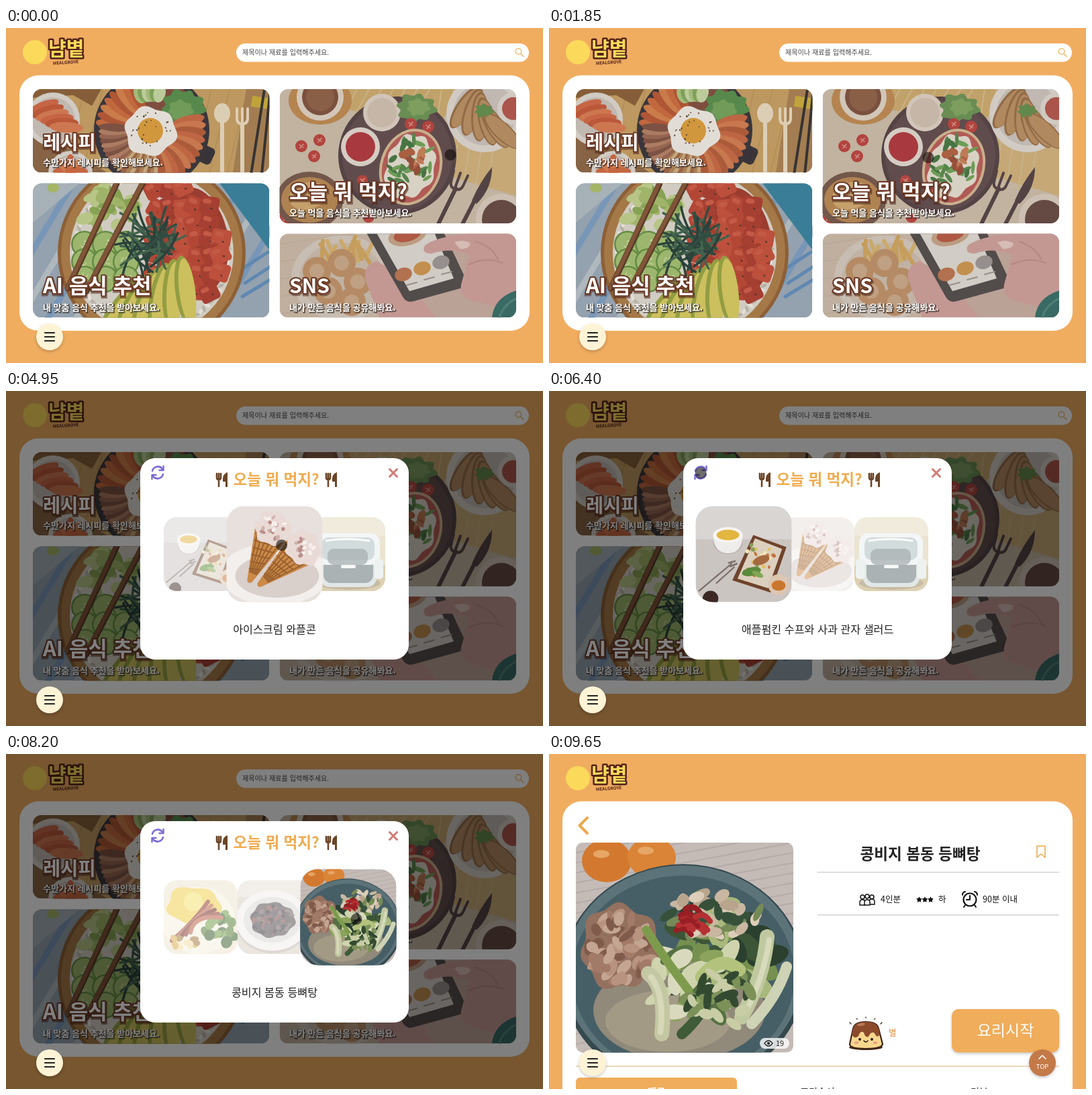
Write an HTML page that moves like this. It is 800 px wide and 499 px high and loops after 9700 ms.

```html
<!DOCTYPE html>
<html lang="ko">
<head>
<meta charset="utf-8">
<title>Recipe app</title>
<style>
html, body { margin: 0; width: 100%; height: 100%; overflow: hidden; background: #f0ad60; }
svg { display: block; width: 100vw; height: 100vh; }
text { font-family: "Noto Sans CJK KR", "Noto Sans CJK", "Noto Sans", sans-serif; }
.lift { filter: drop-shadow(0 2px 2px rgba(0, 0, 0, .22)); }
</style>
</head>
<body>
<svg id="stage" viewBox="0 0 800 499" preserveAspectRatio="none"></svg>
<script>
const LOOP = 9700;
const ORANGE = '#f0ad60';

// ---------- shape helpers ----------
let seed = 7;
const rnd = (a = 0, b = 1) => {
  seed = (seed * 16807) % 2147483647;
  return a + (b - a) * seed / 2147483647;
};
const rep = (n, fn) => Array.from({ length: n }, (_, i) => fn(i)).join('');
const pick = (list, i) => list[i % list.length];
const C = (x, y, r, f, more = '') => `<circle cx="${x}" cy="${y}" r="${r}" fill="${f}" ${more}/>`;
const E = (x, y, rx, ry, f, rot = 0) =>
  `<ellipse cx="${x}" cy="${y}" rx="${rx}" ry="${ry}" fill="${f}" transform="rotate(${rot} ${x} ${y})"/>`;
const R = (x, y, w, h, r, f, more = '') =>
  `<rect x="${x}" y="${y}" width="${w}" height="${h}" rx="${r}" fill="${f}" ${more}/>`;
const P = (d, f, more = '') => `<path d="${d}" fill="${f}" ${more}/>`;
const L = (d, s, w, more = '') =>
  `<path d="${d}" fill="none" stroke="${s}" stroke-width="${w}" stroke-linecap="round" stroke-linejoin="round" ${more}/>`;
const T = (x, y, size, s, more = '') => `<text x="${x}" y="${y}" font-size="${size}" ${more}>${s}</text>`;
const G = (s, more = '') => `<g ${more}>${s}</g>`;
const MID = 'text-anchor="middle"';

// ellipses laid along an arc, long side pointing outwards
const fan = (x, y, r, a, b, n, rx, ry, cols) => rep(n, i => {
  const deg = a + (b - a) * i / Math.max(1, n - 1), q = deg * Math.PI / 180;
  return E(x + r * Math.cos(q), y + r * Math.sin(q), rx, ry, pick(cols, i), deg);
});
const blob = (x, y, rx, ry, amp, k, f) => {
  const pts = Array.from({ length: 60 }, (_, i) => {
    const q = i * Math.PI / 30, m = 1 + amp * Math.sin(k * q) + amp * .5 * Math.cos(3 * q);
    return (x + rx * m * Math.cos(q)).toFixed(1) + ' ' + (y + ry * m * Math.sin(q)).toFixed(1);
  });
  return P('M' + pts.join('L') + 'z', f);
};
const scatter = (n, x, y, rx, ry, a, b, cols) => rep(n, i => {
  const q = rnd(0, 6.28), m = Math.sqrt(rnd());
  return E(x + rx * m * Math.cos(q), y + ry * m * Math.sin(q), a * rnd(.7, 1.2), b * rnd(.7, 1.2), pick(cols, i), rnd(0, 180));
});
let clips = 0;
const clip = (x, y, w, h, r, s) => {
  const id = 'clip' + clips++;
  return `<clipPath id="${id}">${R(x, y, w, h, r, '#000')}</clipPath>` + G(s, `clip-path="url(#${id})"`);
};

// ---------- home cards ----------
const plate = (x, y, r) => C(x, y, r, '#ddd7d0') + C(x, y, r * .82, '#c9c1ba');
const tomato = (x, y, r = 9) => C(x, y, r, '#b93a36') + L(`M${x - 3} ${y - 2}l6 4M${x + 3} ${y - 3}l-5 6`, '#e2a79c', 1.2);

const recipeCard = () =>
  R(40, 91, 352, 124, 0, '#c69c5c') +
  rep(12, i => L(`M${90 + i * 27} 91l-30 124`, '#b98f52', 1.5)) +
  P('M358 91H392V215H338z', '#a87d4b') +
  P('M40 91H142L128 116 100 100 40 104z', '#85592f') + P('M40 150L110 190 150 215H40z', '#875f3c') +
  plate(70, 136, 40) +
  rep(6, i => E(55 + i * 7, 118 + i * 6, 25, 8, pick(['#d0613c', '#c2512f', '#d9754a'], i), -22 + i * 5)) +
  plate(96, 216, 33) + fan(96, 214, 9, 180, 360, 5, 17, 7, ['#cf6238', '#da7a4a']) +
  R(287, 176, 22, 26, 6, '#2b282e', 'transform="rotate(25 298 189)"') +
  C(217, 152, 86, '#2d2a31') + C(217, 152, 77, '#7c4535') +
  fan(217, 152, 57, -172, -112, 8, 27, 8, ['#cc6435', '#b44f2a', '#d47b42']) +
  fan(217, 152, 56, -108, -78, 6, 14, 9, ['#a9c47c', '#7fa653', '#c5d7a0']) +
  blob(264, 118, 31, 25, .1, 9, '#4f8a45') + blob(260, 122, 18, 14, .1, 7, '#6d9f54') +
  fan(217, 152, 56, -14, 78, 12, 25, 8, ['#c7623b', '#d27747', '#b25530']) +
  fan(217, 152, 55, 85, 135, 11, 25, 4, ['#cfac80', '#b0804f', '#9b613c']) +
  fan(217, 152, 55, 140, 184, 9, 24, 6, ['#97614a', '#b27b5e', '#7b4b3a']) +
  blob(215, 154, 38, 36, .06, 6, '#f0ece5') + C(215, 153, 19, '#dd9b33') +
  scatter(26, 215, 153, 31, 29, 1.5, 1, ['#5a432c']) +
  G(E(322, 127, 12, 15, '#eadbbf') + R(319, 139, 6, 82, 3, '#eadbbf') +
    L('M344 120v14q0 9 8 9t8-9v-14M352 120v23', '#eadbbf', 4) + R(349, 140, 6, 80, 3, '#eadbbf')) +
  R(366, 103, 40, 16, 0, '#c9aa31', 'transform="rotate(8 380 110)"') +
  L('M386 85L365 218M393 100L381 218', '#2a2628', 4);

const bowlCard = () =>
  R(40, 231, 352, 200, 0, '#95a5b3') +
  rep(11, i => L(`M${20 + i * 42} 225l-130 215`, pick(['#7698bd', '#b2bec4'], i), 9)) +
  P('M318 231H392V330z', '#317d98') + P('M40 290L110 231H40z', '#a9b7be') +
  E(70, 238, 9, 7, '#a7bb64') + L('M350 360l40 -26M356 380l40-26M352 400l40-24', '#5a89b6', 5) +
  C(217, 335, 140, '#8d5c2e') + C(217, 335, 135, '#a87740') + C(217, 335, 122, '#d9d5ca') +
  rep(100, i => { const q = i * .063; return E(217 + 114 * Math.cos(q), 335 + 114 * Math.sin(q), 5, 2.4, pick(['#eeebe2', '#bdb7aa'], i), i * 47); }) +
  E(277, 318, 54, 82, '#9c3526', -8) +
  rep(42, i => {
    const x = 222 + (i % 6) * 20 + rnd(-4, 4), y = 240 + Math.floor(i / 6) * 25 + rnd(-4, 4);
    if (Math.hypot(x - 210, y - 328) > 116) return '';
    return G(R(x - 14, y - 13, 29, 27, 5, pick(['#b8412e', '#a83829', '#c24b34'], i)) +
      R(x - 10, y - 9, 13, 7, 4, '#c9563f') + E(x + 4, y + 5, 2, 1, '#3b2a22', 30), `transform="rotate(${rnd(-30, 30)} ${x} ${y})"`);
  }) +
  scatter(32, 153, 270, 43, 33, 12, 8, ['#a3ba66', '#87a64e', '#bccd88']) +
  rep(9, i => {
    const x = 117 + (i % 3) * 31, y = 322 + Math.floor(i / 3) * 26;
    return C(x, y, 20, '#5f8c3c') + C(x, y, 17.5, '#9fbc6b') + scatter(5, x, y, 8, 8, 2, 1, ['#cfdba5']);
  }) +
  rep(6, i => E(172 + i * 19, 416 - i * 5, 15, 52, '#93a03b', 38 - i * 9) + E(175 + i * 19, 417 - i * 5, 12, 49, '#d3c65a', 38 - i * 9)) +
  rep(34, i => {
    const q = rnd(0, 6.28), x = 213 + rnd(-24, 24), y = 319 + rnd(-24, 24), a = 32 * Math.cos(q), b = 32 * Math.sin(q);
    return L(`M${x - a} ${y - b}q${a + b * .3} ${b - a * .3} ${a * 2} ${b * 2}`, pick(['#28473a', '#1f3a33', '#3b6048'], i), 3.5);
  }) +
  L('M168 225L92 388M207 225L120 392', '#50301e', 9) + L('M167 225L91 388M206 225L119 392', '#805030', 6);

const todayCard = () =>
  R(408, 91, 352, 200, 0, '#cbbba6') +
  P('M500 91H680L645 145 500 120z', '#cba768') + P('M640 160H760V250L640 215z', '#cfae76') +
  rep(14, i => L(`M${505 + i * 18} 91l-22 ${i > 7 ? 150 : 40}`, '#d3ba88', 2)) +
  E(468, 108, 47, 36, '#bd8549') + C(468, 103, 35, '#ddd1c2') + C(468, 103, 27, '#784934') + C(468, 103, 21, '#8b5a3f') +
  C(583, 190, 88, '#4c393c') + C(583, 190, 82, '#5a4346') +
  C(560, 126, 28, '#ddd0c3') + C(560, 126, 22, '#d0bfae') +
  C(528, 177, 29, '#e2d8cf') + C(528, 177, 22, '#ad2f36') +
  blob(611, 119, 28, 20, .12, 8, '#648f4c') + blob(614, 118, 16, 12, .12, 7, '#7ca35c') +
  tomato(603, 143) + tomato(629, 147) + tomato(531, 227, 8) +
  G(E(603, 207, 46, 58, '#d3b78f') + E(603, 207, 42, 54, '#b8554f') + blob(602, 207, 36, 48, .06, 8, '#e5dfd2') +
    scatter(26, 600, 207, 33, 43, 10, 3.5, ['#4e8543', '#6aa052', '#3d7239']) +
    scatter(13, 603, 203, 20, 25, 8, 4.5, ['#b05a38', '#c97a50', '#974631']), 'transform="rotate(18 603 207)"') +
  tomato(440, 176) + tomato(467, 167) + tomato(459, 191) + tomato(415, 284) +
  E(452, 257, 50, 43, '#705044') + E(452, 256, 42, 34, '#b5834a') + E(450, 250, 29, 20, '#d0a569', -15) +
  plate(713, 128, 57) +
  rep(6, i => E(684 + i * 11, 118 + i * 7, 13, 37, '#94683f', 34 - i * 16) + E(685 + i * 11, 119 + i * 7, 11, 34, '#b88b5c', 34 - i * 16)) +
  blob(712, 123, 13, 9, .2, 7, '#5c8a45') +
  C(756, 120, 24, '#ddd6ce') + C(756, 120, 17, '#b14d44') +
  L('M667 213l-4 16q-2 8 6 11t12-5l7-15M677 216l-8 22', '#4b393b', 4) + L('M670 239L642 296', '#4b393b', 6) +
  P('M724 207Q724 240 701 262L694 257Q705 231 724 207z', '#4b393b') + L('M697 259L680 292', '#4b393b', 6) +
  C(738, 285, 38, '#d8cbbd') + C(738, 285, 29, '#5e4139') + E(540, 284, 8, 6, '#b93a36');

const socialCard = () =>
  R(408, 306, 352, 125, 0, '#c9b7a4') + P('M640 306H760V431H610z', '#c4a79b') +
  rep(5, i => L(`M408 ${322 + i * 26}l180 -26`, '#bfab98', 1.2)) +
  E(500, 372, 75, 63, '#d3c7bb') + E(500, 372, 63, 52, '#c9baab') +
  rep(13, i => L(`M${470 + i * 6} ${350 - i % 4 * 3}l${rnd(-25, 20)} ${rnd(-34, -14)}`, pick(['#cfa257', '#d6b069'], i), 6)) +
  rep(5, i => C(pick([463, 500, 524, 480, 515], i), pick([362, 350, 378, 392, 408], i), 16, '#c9a584', 'stroke="#bd8d62" stroke-width="10"')) +
  P('M552 347Q527 356 538 382L556 431H640L594 372z', '#cd9c97') +
  P('M534 300L592 402Q598 410 607 407L680 387Q689 383 685 374L650 300z', '#494344') +
  P('M549 300L601 392 667 373 636 300z', '#ddd8d1') +
  E(598, 309, 29, 15, '#c3a082', -14) + E(598, 308, 21, 10, '#b5533d', -14) +
  rep(3, i => E(592 + i * 28, 367 - i * 9, 13, 10, pick(['#b96f48', '#cc9147', '#989190'], i), -18) +
    L(`M${597 + i * 26} ${383 - i * 8}l15 -4`, '#9b928c', 2)) +
  P('M760 306H690Q640 311 624 324 618 336 634 336 664 326 690 338L680 375Q672 398 690 405L760 424z', '#cd9c97') +
  P('M668 319q14-5 24 2-2 9-16 8z', '#e2c6be') + L('M700 318Q725 326 733 345M690 352Q715 340 740 350', '#b98884', 2) +
  P('M724 431Q727 402 760 391V431z', '#2c6660') + L('M735 431q5-18 25-28', '#4a8076', 3);

const label = (x, y, size, title, sub, gap) =>
  T(x + 1, y + 2, size, title, 'fill="#4a2418" stroke="#4a2418" stroke-width="5" opacity=".55" font-weight="700"') +
  T(x, y, size, title, 'fill="#fff" stroke="#6b3825" stroke-width="4" stroke-linejoin="round" paint-order="stroke" font-weight="700"') +
  T(x + 1, y + gap + 1, 13, sub, 'fill="#2b211c" stroke="#2b211c" stroke-width="1.6" opacity=".65" font-weight="700"') +
  T(x, y + gap, 13, sub, 'fill="#fff" font-weight="700"');

const logo = () =>
  C(43, 36, 18, '#fbd95a') +
  T(63, 42, 29, '냠볕', 'font-weight="900" fill="#fbd95a" stroke="#55231a" stroke-width="5" stroke-linejoin="round" paint-order="stroke"') +
  T(70, 55, 6.4, 'MEALGROVE', 'font-weight="700" fill="#55231a" transform="rotate(-4 70 55)"');

// the grey veil mutes the artwork
const card = (x, y, w, h, veil, art) =>
  clip(x, y, w, h, 13, art + R(x, y, w, h, 0, '#85807c', `opacity="${veil}"`));

const home = () =>
  logo() + R(343, 23, 436, 27.5, 13.7, '#fff') +
  T(352, 40, 10.1, '제목이나 재료를 입력해주세요.', 'fill="#444"') +
  C(763.5, 35, 4.3, 'none', 'stroke="#efb45c" stroke-width="1.3"') + L('M767 38.5l4 4', '#efb45c', 1.5) +
  R(20, 70.5, 760, 380.5, 28, '#fff') +
  card(40, 91, 352.5, 124.5, .14, recipeCard()) + label(55, 181, 28.5, '레시피', '수만가지 레시피를 확인해보세요.', 24) +
  card(40, 231.5, 352.5, 200, .1, bowlCard()) + label(55, 395, 31, 'AI 음식 추천', '내 맞춤 음식 추천을 받아보세요.', 26) +
  card(407.5, 91, 352.5, 200, .14, todayCard()) + label(422, 255, 31, '오늘 뭐 먹지?', '오늘 먹을 음식을 추천받아보세요.', 25) +
  card(407.5, 306.5, 352.5, 125, .14, socialCard()) + label(422, 395, 30, 'SNS', '내가 만든 음식을 공유해봐요.', 26);

// ---------- dishes, each drawn in a 110 x 110 box ----------
const soup = () =>
  R(0, 0, 110, 110, 0, '#cbc5c2') + R(0, 0, 110, 38, 0, '#d9d5d2') +
  E(37, 42, 17, 13, '#bcb5b1') + P('M20 33Q21 54 37 54T54 33z', '#efedeb') + E(37, 33, 17, 9, '#f6f4f2') + E(37, 33, 13, 6, '#e3b541') +
  P('M66 33L104 47 86 99 42 85z', '#6f432c') + P('M68 37L99 49 83 94 48 83z', '#dccfbd') +
  scatter(22, 74, 62, 17, 22, 2.5, 2, ['#f3e6b4', '#c47440', '#e2c05f', '#8a9a58']) +
  E(75, 62, 10, 5, '#a56a3f', -20) + E(64, 75, 11, 5, '#5b8a3a', -12) + E(71, 78, 7, 3, '#7fa653', 25) +
  L('M41 66L4 97M44 70L24 88', '#7c6f69', 1.8) + L('M45 63l-7 2M47 66l-7 3', '#7c6f69', 2) +
  C(95, 90, 12, '#ddc6b0') + E(95, 91, 8, 6, '#c9772f') + C(17, 106, 9, '#3c2724');

const cones = () => {
  const cone = (x, y, rot) => G(
    P('M-19 0H19L3 58Q0 62 -3 58z', '#cb8a48') +
    rep(6, i => L(`M${-16 + i * 2} ${i * 8 + 5}L${16 - i * 2} ${i * 8 + 1}M${-15 + i * 6} 2L${-4 + i * 1.6} 48`, '#99602f', 1.5)) +
    blob(0, -8, 21, 19, .07, 7, '#e9dad6') + scatter(16, 0, -9, 15, 13, 3, 2, ['#f7efec', '#cfb2ac', '#b98f88']),
    `transform="translate(${x} ${y}) rotate(${rot})"`);
  return R(0, 0, 110, 110, 0, '#e7e0dd') + E(55, 78, 62, 36, '#f3efed') + E(58, 80, 48, 25, '#d9cfcb') +
    cone(50, 33, 24) + cone(82, 53, 50);
};

const box = () =>
  R(0, 0, 110, 110, 0, '#d9cba6') + R(0, 0, 110, 28, 0, '#e3d8bb') + R(0, 72, 110, 38, 0, '#bda468') +
  E(55, 98, 48, 10, '#8f7b4f') + R(13, 52, 84, 52, 14, '#c5d0cf') + R(18, 57, 74, 41, 12, '#59686a') +
  R(7, 24, 95, 47, 14, '#e9efee') + R(15, 30, 79, 34, 10, '#a9babb') + R(24, 47, 60, 24, 9, '#556366', 'opacity=".75"') +
  R(2, 62, 14, 30, 5, '#dde6e5') + R(94, 62, 13, 30, 5, '#dde6e5') + L('M22 35q30 -5 64 0', '#f8fbfa', 3) + R(44, 71, 22, 5, 2, '#eef3f2');

const brunch = () =>
  R(0, 0, 110, 110, 0, '#efe5ce') + E(52, 60, 54, 50, '#f6f0e1') + blob(44, 37, 40, 27, .08, 5, '#f0cf45') + C(44, 32, 14, '#f6e06a') +
  scatter(22, 84, 72, 22, 25, 8, 7, ['#4f7a30', '#6d9a42', '#345a25']) +
  rep(5, i => L(`M${12 + i * 7} ${90 - i * 3}Q45 ${62 - i * 3} ${66 + i * 5} ${32 + i * 6}`, pick(['#8a3326', '#b65c41', '#6a251f'], i), 6)) +
  scatter(12, 32, 94, 25, 10, 6, 4, ['#d9a948', '#a37438', '#f2dea0']);

const beans = () =>
  R(0, 0, 110, 110, 0, '#d9cfc2') + R(0, 0, 110, 25, 0, '#e6dfd6') + E(52, 65, 54, 44, '#bfb5aa') + E(52, 60, 54, 45, '#f1efec') +
  E(52, 59, 43, 34, '#d9d6d2') + blob(52, 59, 33, 26, .05, 8, '#4b4244') +
  scatter(70, 52, 58, 30, 23, 4, 3, ['#2d292d', '#6b5a5b', '#7a4343', '#423b40']);

// larger dish photo, 324 x 324
const stew = () =>
  R(0, 0, 324, 324, 0, '#c4bbb7') + rep(22, i => L(`M0 ${i * 15}L324 ${i * 15 - 60}`, '#b5aba8', 2)) +
  E(46, 27, 37, 32, '#d3792f') + E(113, 22, 36, 30, '#da8437') + E(104, 12, 12, 6, '#e6a666') + E(38, 17, 12, 6, '#e6a666') +
  E(160, 198, 181, 166, '#36494f') + E(160, 194, 177, 160, '#5b7379') + E(160, 198, 166, 149, '#465f66') +
  E(154, 250, 128, 75, '#91897a') + E(137, 266, 93, 46, '#a39a85') +
  blob(66, 155, 58, 62, .07, 7, '#94705f') + scatter(60, 66, 155, 48, 52, 12, 7, ['#b8937f', '#805b4b', '#c4a592', '#a27b68']) +
  scatter(34, 205, 165, 82, 68, 28, 14, ['#3d5537', '#2b402e', '#75904f', '#a9b87c']) +
  scatter(26, 175, 205, 72, 52, 24, 11, ['#8ba35c', '#cfd4ae', '#557144', '#d9dabd']) +
  L('M108 195Q135 215 128 285', '#c3c8a2', 22) + L('M112 200Q132 225 126 282', '#d6d8b8', 9) +
  L('M285 140Q280 200 247 260', '#c0c8a0', 22) + L('M288 145Q280 200 254 250', '#d7dbbc', 8) +
  L('M314 185Q300 230 262 270', '#cfd3b5', 16) +
  L('M105 130Q130 170 168 220', '#7e9b4d', 13) + L('M187 200Q215 165 244 190', '#b3c37d', 19) +
  L('M158 285Q185 262 203 222', '#3f5b38', 16) +
  scatter(44, 205, 108, 68, 34, 13, 7, ['#c9b7a1', '#36503a', '#dccdb9', '#758a56', '#b9a48d']) +
  scatter(30, 215, 235, 50, 40, 14, 7, ['#334a31', '#7c9158', '#c8cda6']) +
  rep(10, i => L(`M${145 + rnd(0, 38)} ${97 + rnd(0, 38)}q13 -8 22 6`, pick(['#971f24', '#b53133'], i), 8));
const stewThumb = () => G(stew(), `transform="scale(${110 / 324})"`);

const SETS = [
  [['애플펌킨 수프와 사과 관자 샐러드', soup], ['아이스크림 와플콘', cones], ['건포도 발효종', box]],
  [['베이컨 브로콜리 덮밥', brunch], ['검은콩 조림', beans], ['콩비지 봄동 등뼈탕', stewThumb]]
];

// ---------- dialog ----------
const cutlery = x =>
  L(`M${x - 7} 123v6q0 3 3 3t3 -3v-6M${x - 4} 123v19`, '#6b4527', 2.6) +
  P(`M${x + 9} 121v22h-3v-8h-4q-1 -12 7 -14z`, '#6b4527');

const dialog = () =>
  R(0, 0, 800, 499, 0, '#000', 'opacity=".5"') +
  R(200, 100, 400, 300, 22, '#fff') +
  L('M218 119A8.5 8.5 0 0 1 233 116M234 124A8.5 8.5 0 0 1 219 127', '#7b6bd6', 2.6) +
  L('M234.500 112v6h-6M217.500 131v-6h6', '#7b6bd6', 2.4) +
  L('M571.500 116.500l11 11M582.500 116.500l-11 11', '#d27a74', 3) +
  cutlery(321) + cutlery(484) +
  T(402.5, 140, 22.6, '오늘 뭐 먹지?', `${MID} font-weight="900" fill="#f0ab4f"`) +
  SETS.map((set, s) => G(set.map(([, art], i) =>
    G(clip(0, 0, 110, 110, 20, art()), `id="dish${s}${i}"`)).join(''), `id="set${s}"`)).join('') +
  T(400, 361, 16.2, '', `id="dishName" ${MID} font-weight="500" fill="#222"`);

// ---------- recipe page ----------
const star = (x, y, r) => P('M' + Array.from({ length: 10 }, (_, i) => {
  const q = i * Math.PI / 5 - Math.PI / 2, m = i % 2 ? r * .55 : r;
  return (x + m * Math.cos(q)) + ' ' + (y + m * Math.sin(q));
}).join('L') + 'z', '#111');

const pudding = () =>
  E(472, 437, 25, 4, '#4a2c1b') +
  P('M453 409Q455 399 472 399T491 409L497 432Q496 439 472 439T448 432z', '#f7d78e', 'stroke="#3c2417" stroke-width="2.2"') +
  P('M453 409Q455 399 472 399T491 409L493 417Q489 425 485 416 480 412 476 421 471 423 469 415 464 411 461 420 455 426 451 417z', '#8b4b2b') +
  E(465, 403, 6, 2, '#b97b52', -10) + C(463, 425, 2, '#2d1c15') + C(481, 425, 2, '#2d1c15') +
  L('M469 427q3 4 6 0', '#2d1c15', 1.4) + E(458, 430, 3, 2, '#ee9d84') + E(486, 430, 3, 2, '#ee9d84') +
  L('M450 402l-2 -2M459 395l-.5 -1M472 393v-1M485 395l.5 -1M494 402l2 -2', '#3c2417', 1.4);

const info = (x, s) => T(x, 221, 12.5, s, 'font-weight="500" fill="#111"');

const detail = () =>
  logo() + R(20, 70.5, 760, 460, 28, '#fff') +
  L('M57 95L45.500 106.500 57 118', '#eda94f', 4) +
  clip(40, 132, 324, 312.5, 10, G(stew(), 'transform="translate(40 132)"')) +
  R(314, 423, 44, 16, 8, '#fff', 'opacity=".8"') +
  L('M321 431q6 -8 12 0q-6 8 -12 0z', '#222', 1.4) + C(327, 431, 2.1, '#222') + T(338, 435, 11, '19', 'font-weight="500" fill="#222"') +
  T(553, 157, 22.6, '콩비지 봄동 등뼈탕', `${MID} font-weight="700" fill="#222"`) +
  L('M727 137h12v17l-6 -5 -6 5z', '#eda94f', 1.6) +
  R(400, 175.5, 360, 1.4, 0, '#d3d0cd') + R(400, 239, 360, 1.4, 0, '#d3d0cd') +
  [467, 481, 474].map((x, i) => P(`M${x - 4} ${225 - i % 2}v-4q0 -4 4 -4t4 4v4z`, '#fff', 'stroke="#111" stroke-width="1.5"') +
    C(x, 213 - (i === 2 ? 1 : 0), 3, '#fff', 'stroke="#111" stroke-width="1.5"')).join('') +
  info(494, '4인분') + star(551.5, 217, 4.6) + star(560, 217, 4.6) + star(568.5, 217, 4.6) + info(580, '하') +
  C(627, 217, 9.5, '#fff', 'stroke="#111" stroke-width="2.2"') +
  L('M627 211v6h-5M616 210q0 -4 4 -5M638 210q0 -4 -4 -5M620 225l-2 3M634 225l2 3', '#111', 2) + info(646, '90분 이내') +
  pudding() + T(506, 420, 12.5, '별', 'font-weight="500" fill="#d98d3c"') +
  R(600, 380, 160, 64.5, 10, '#f0ad5b', 'class="lift"') + T(680, 420, 23, '요리시작', `${MID} font-weight="500" fill="#fff"`) +
  R(40, 464.5, 720, 1.2, 0, '#e3bd8c') +
  R(40, 482, 240, 40, 6, '#f0ad5b') + T(160, 508, 14, '재료', `${MID} font-weight="700" fill="#fff"`) +
  T(400, 508, 14, '조리순서', `${MID} fill="#333"`) + T(641, 508, 14, '리뷰', `${MID} fill="#333"`) +
  C(735, 460, 20, '#c47a48', 'class="lift"') + L('M730 454l5 -5 5 5', '#fff', 1.6) + T(735, 469, 9.5, 'TOP', `${MID} fill="#fff"`);

const stage = document.getElementById('stage');
stage.innerHTML =
  R(0, 0, 800, 499, 0, ORANGE) +
  G(home(), 'id="home"') + G(detail(), 'id="detail"') + G(dialog(), 'id="dialog"') +
  G(C(65, 460, 20, '#fff3d6', 'class="lift"') + L('M58 454h14M58 460h14M58 466h14', '#222', 2.2), 'id="menu"') +
  C(0, 0, 8.5, '#0f0c0c', 'id="cursor" opacity=".6"');

// ---------- motion ----------
const $ = id => document.getElementById(id);
const ramp = (t, a, b) => Math.min(1, Math.max(0, (t - a) / (b - a)));
const ease = p => p * p * (3 - 2 * p);
const fade = (id, v) => {
  $(id).setAttribute('opacity', v);
  $(id).style.display = v > 0 ? '' : 'none';
};

// cursor: start, end, x, y
const START = [662, 189];
const MOVES = [[1100, 1850, 565, 193], [3000, 3350, 418, 229], [4900, 5250, 290, 240], [5650, 5850, 226, 122], [7550, 7950, 522, 246]];
// chosen dish: time, index
const CHOICES = [[0, 2], [4200, 1], [5200, 0], [7900, 2]];
const SWAP = 6500;

function draw(t) {
  let [x, y] = START;
  for (const [a, b, px, py] of MOVES) {
    const p = ease(ramp(t, a, b));
    x += (px - x) * p;
    y += (py - y) * p;
  }
  $('cursor').setAttribute('transform', `translate(${x} ${y})`);
  fade('cursor', .6 * (1 - ramp(t, 9420, 9500)));

  fade('home', 1 - ramp(t, 8700, 9180));
  fade('detail', ramp(t, 9180, 9500));
  fade('dialog', ramp(t, 2300, 2600) * (1 - ramp(t, 8500, 8700)));

  const set = t < SWAP ? 0 : 1;
  fade('set0', 1 - set);
  fade('set1', set);
  let size = [0, 0, 0], chosen = 2;
  CHOICES.forEach(([at, i]) => {
    if (t < at) return;
    const p = at ? ease(ramp(t, at, at + 280)) : 1;
    size = size.map((v, k) => v + ((k === i) - v) * p);
    chosen = i;
  });
  size.forEach((v, i) => {
    const dish = $(`dish${set}${i}`), k = 1 + .3 * v;
    dish.setAttribute('transform', `translate(${290 + i * 110 - 55 * k} ${243 - 55 * k}) scale(${k})`);
    dish.setAttribute('opacity', .5 + .5 * v);
  });
  const group = $('set' + set), top = $(`dish${set}${chosen}`);
  if (group.lastChild !== top) group.appendChild(top);
  $('dishName').textContent = SETS[set][chosen][0];
}

function tick() {
  draw(performance.now() % LOOP);
  requestAnimationFrame(tick);
}
tick();
</script>
</body>
</html>
```
